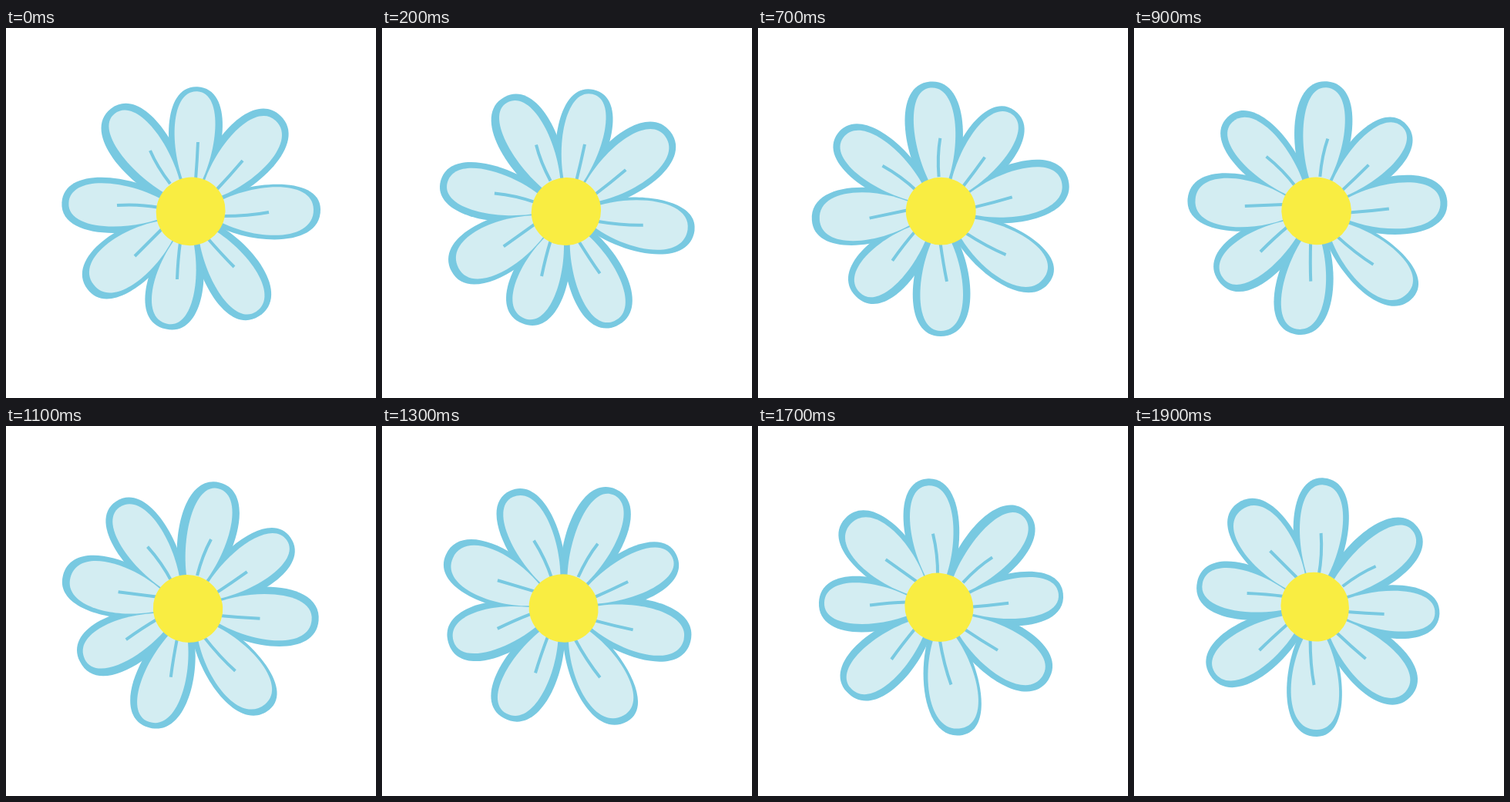
An HTML page for the animation above (2 s loop, 480x480 px).

```html
<!DOCTYPE html>
<html lang="en">
<head>
<meta charset="utf-8">
<title>Turning daisy</title>
<style>
  html, body { margin: 0; width: 100%; height: 100%; overflow: hidden; background: #fff; }
  svg { display: block; width: 100%; height: 100%; }
  .rim { fill: #78c9e1; }
  .leaf { fill: #d3edf2; }
  .vein { fill: none; stroke: #78c9e1; stroke-width: 4; }
  .disc { fill: #f9ed42; }
</style>
</head>
<body>
<svg viewBox="0 0 480 480">
  <g id="flower">
    <g id="rims" class="rim"></g>
    <g id="leaves" class="leaf"></g>
    <g id="veins" class="vein"></g>
    <ellipse class="disc" rx="45.4" ry="43.8" transform="translate(239.6 237.9) rotate(-33)"/>
  </g>
</svg>
<script>
const STEPS = 20, STEP_MS = 100, TURN = 90;
const PIVOT = '238.8 233.8';

// angle; rim and leaf as [length, left half-width, right half-width]; vein path
const petals = [
  { angle: 3,   rim: [162, 34, 35], leaf: [156, 27, 26], vein: 'M246 197Q248 172 249 148' },
  { angle: 43,  rim: [170, 38, 38], leaf: [161, 29, 31], vein: 'M272 211Q291 191 307 172' },
  { angle: 89,  rim: [168, 33, 38], leaf: [159, 30, 33], vein: 'M281 244Q315 244 341 239' },
  { angle: 147, rim: [162, 38, 36], leaf: [155, 29, 27], vein: 'M260 271Q280 294 296 310' },
  { angle: 192, rim: [156, 36, 36], leaf: [149, 26, 28], vein: 'M226 278Q223 300 222 326' },
  { angle: 233, rim: [168, 36, 38], leaf: [158, 31, 32], vein: 'M202 261Q184 279 167 296' },
  { angle: 274, rim: [168, 35, 36], leaf: [159, 27, 29], vein: 'M199 233Q172 228 144 230' },
  { angle: 322, rim: [169, 37, 37], leaf: [161, 26, 28], vein: 'M213 202Q196 180 187 159' }
];

const byId = id => document.getElementById(id);

function addPath(parent, d, transform) {
  const path = document.createElementNS('http://www.w3.org/2000/svg', 'path');
  path.setAttribute('d', d);
  if (transform) path.setAttribute('transform', transform);
  byId(parent).append(path);
}

// Petal pointing up from the origin; base, waist and shoulder shape its sides.
function petalPath([length, left, right], base, waist, shoulder) {
  return `M${-base * left} -25
    C${-waist * left} -75 ${-shoulder * left} ${-length} 0 ${-length}
    C${shoulder * right} ${-length} ${waist * right} -75 ${base * right} -25Z`;
}

for (const { angle, rim, leaf, vein } of petals) {
  const place = `translate(240 238) rotate(${angle})`;
  addPath('rims', petalPath(rim, 0.4, 1.2, 1.35), place);
  addPath('leaves', petalPath(leaf, 0.2, 1.22, 1.36), place);
  addPath('veins', vein);
}

function draw(now) {
  const step = Math.floor(now / STEP_MS) % STEPS;
  byId('flower').setAttribute('transform', `rotate(${step * TURN / (STEPS - 1)} ${PIVOT})`);
  requestAnimationFrame(draw);
}
draw(0);
</script>
</body>
</html>
```
